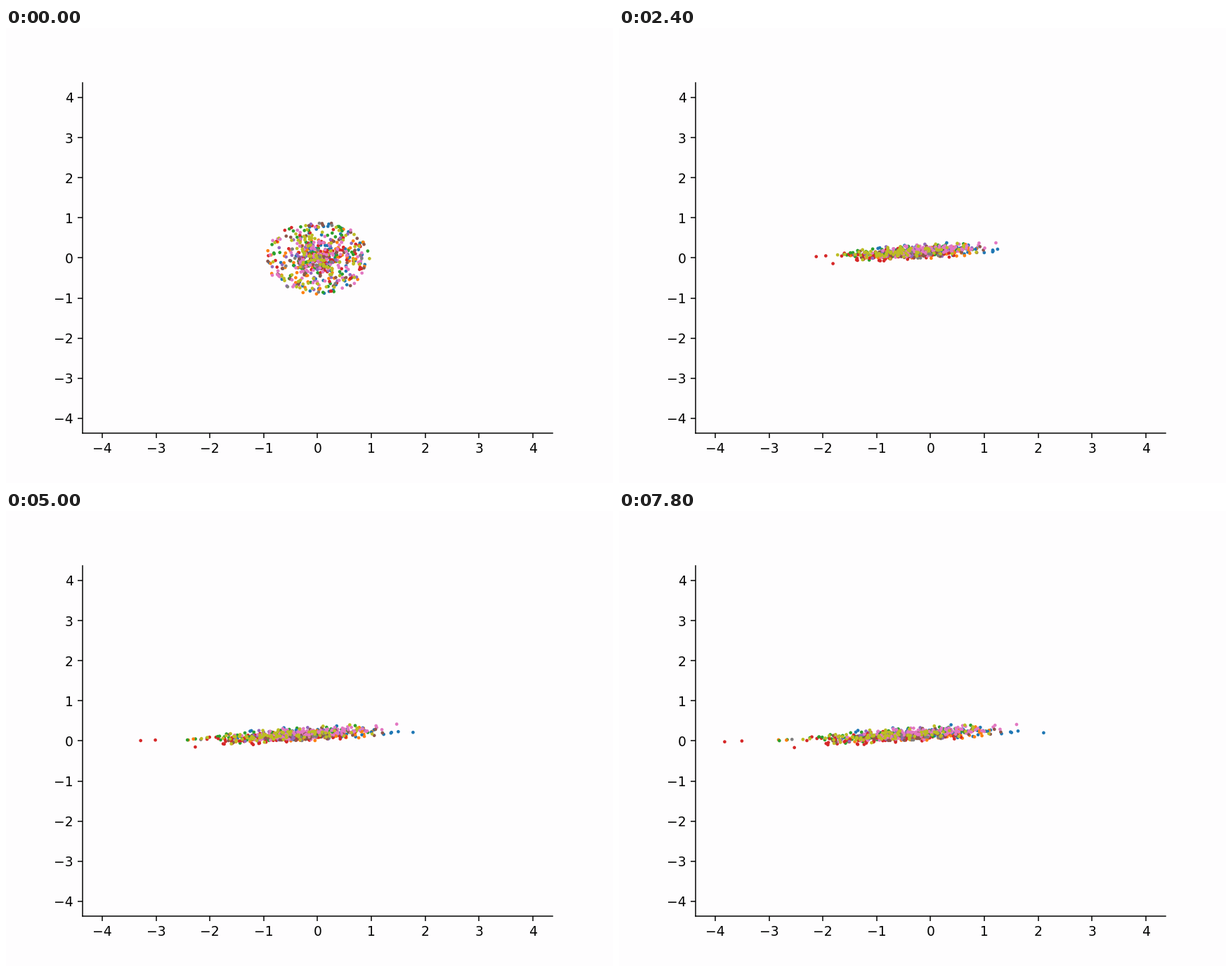
Recreate the animation shown at these times as a matplotlib script. Size 864 by 648 pixels, loop 8 s.

```python
import numpy as np
import matplotlib.pyplot as plt
from matplotlib.animation import FuncAnimation

FRAMES, STEP = 40, 200
LIM = 4.37
PALETTE = np.array(plt.get_cmap("tab10").colors[:9])
# Far stragglers: palette index and final x
STRAGGLERS = [(3, -3.84), (3, -3.52), (2, -2.82), (1, -2.81),
              (1, -2.69), (2, -2.67), (7, -2.56), (0, 2.10)]
BULK = 690

rng = np.random.default_rng(7)


def bounded_normal(n, limit=2.5):
    v = rng.standard_normal(n)
    return np.where(abs(v) > limit, rng.uniform(-limit, limit, n), v)


def growth(t):
    return 1 - np.exp(-t / 3.5)


# Nine groups, a few of them sparse
share = np.ones(9)
share[[4, 5]] = 0.6
share[7] = 0.2
kind = rng.choice(9, BULK, p=share / share.sum())

# Each group sits a little to one side of the band
spread = 0.95 * bounded_normal(BULK) + 0.45 * np.cos(kind * np.pi / 3)
lift = 0.068 * bounded_normal(BULK) + 0.025 * (-1.0) ** kind

far_kind, far_end = np.array(STRAGGLERS).T
total = BULK + len(STRAGGLERS)
group = np.append(kind, far_kind).astype(int)
order = np.argsort(group + rng.uniform(0, 3, total))

radius = rng.uniform(0, 0.97, total)
angle = rng.uniform(0, 2 * np.pi, total)
disc = np.column_stack([radius * np.cos(angle), 0.94 * radius * np.sin(angle)])
phase = rng.uniform(0, 2 * np.pi, (total, 2))
rate = rng.uniform(0.8, 2.2, (total, 2))


def positions(frame):
    t = frame * STEP / 1000
    g = growth(t)
    x = -0.1 - 0.42 * g + (0.30 + 0.50 * g) * spread
    y = 0.14 + 0.035 * g + 0.07 * x + lift
    far_x = far_end * g / growth(7.8)
    far_y = 0.13 + 0.04 * far_x
    band = np.column_stack([np.append(x, far_x), np.append(y, far_y)])
    band += np.sin(rate * t + phase) * [0.015, 0.012]
    keep = 0.4 ** frame  # the disc collapses quickly onto the band
    return (keep * disc + (1 - keep) * band)[order]


plt.rcParams["font.family"] = "DejaVu Sans"
fig, ax = plt.subplots(figsize=(6.4, 4.8), dpi=135, facecolor="#fefdfe")
fig.subplots_adjust(left=0.1258, right=0.9005, bottom=0.1094, top=0.88)
ax.set(xlim=(-LIM, LIM), ylim=(-LIM, LIM), facecolor="none",
       xticks=range(-4, 5), yticks=range(-4, 5))
ax.spines[["top", "right"]].set_visible(False)
dots = ax.scatter(*positions(0).T, s=1, c=PALETTE[group[order]], linewidths=1.5)


def update(frame):
    dots.set_offsets(positions(frame))
    return (dots,)


anim = FuncAnimation(fig, update, frames=FRAMES, interval=STEP,
                     repeat=True, repeat_delay=0, blit=False)
plt.show()
```
